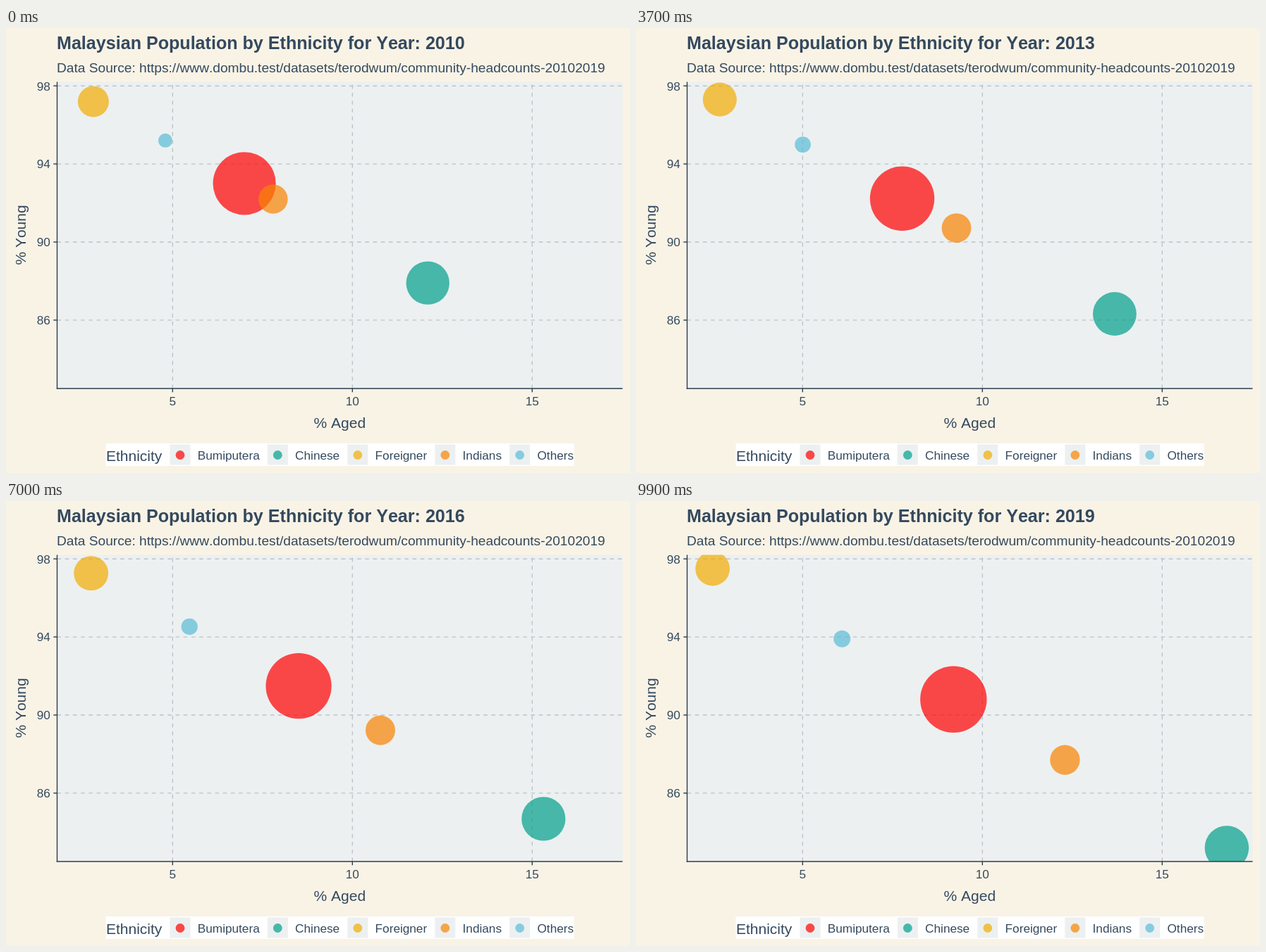
Write an HTML page that moves like this. It is 885 px wide and 632 px high and loops after 10000 ms.

```html
<!DOCTYPE html>
<html lang="en">
<head>
<meta charset="utf-8">
<title>Population by ethnicity</title>
<style>
  html, body { margin: 0; width: 100%; height: 100%; overflow: hidden; background: #f9f3e6; }
  svg { display: block; width: 885px; height: 632px; }
  text {
    font-family: "Liberation Sans", Arial, sans-serif;
    font-size: 17.2px; font-kerning: none; fill: #34495e;
  }
  .title { font-size: 25.1px; font-weight: bold; }
  .sub { font-size: 19.15px; }
  .name { font-size: 21px; }
  .mid { text-anchor: middle; }
  .end { text-anchor: end; }
  .grid { stroke: #bdc3c7; stroke-width: 1.4; stroke-dasharray: 5.6 5.6; }
  .axis { stroke: #2c3e50; stroke-width: 1.4; }
  .dot { fill-opacity: .7; }
</style>
</head>
<body>
<svg viewBox="0 0 885 632">
  <clipPath id="panel"><rect x="72.5" y="76.5" width="802" height="435.5"/></clipPath>
  <rect x="72.5" y="76.5" width="802" height="435.5" fill="#ecf0f1"/>
  <g id="grid"></g>
  <g id="bubbles" clip-path="url(#panel)"></g>
  <g id="axes"></g>
  <text id="title" class="title" x="72" y="30"></text>
  <text class="sub" x="72" y="63">Data Source: https://www.dombu.test/datasets/terodwum/community-headcounts-20102019</text>
  <text class="name mid" x="473.3" y="567.5">% Aged</text>
  <text class="name mid" transform="translate(28 294) rotate(-90)">% Young</text>
  <rect x="141.5" y="590" width="664" height="32" fill="#fff"/>
  <text class="name" x="142" y="615">Ethnicity</text>
  <g id="legend"></g>
</svg>
<script>
const STEP = 100, STEPS = 100, FIRST = 2010, YEARS = 9;

// trend: a few turning points as [years since FIRST, % aged, radius]
const groups = [
  { name: "Bumiputera", color: "#ff0000", key: 232.5,
    trend: [[0, 7, 44.6], [3, 7.7, 45.6], [6, 8.36, 46.5], [9, 9.24, 47.2]] },
  { name: "Chinese", color: "#00a08a", key: 370.8,
    trend: [[0, 12.1, 30.7], [3, 13.54, 30.9], [6, 15.06, 31.1], [9, 16.84, 31.3]] },
  { name: "Foreigner", color: "#f2ad00", key: 484.3,
    trend: [[0, 2.8, 22], [3, 2.74, 24], [6, 2.74, 24.4], [7, 2.8, 24.5], [9, 2.54, 24.4]] },
  { name: "Indians", color: "#f98400", key: 608.3,
    trend: [[0, 7.8, 20.7], [3, 9.1, 20.9], [6, 10.56, 21], [9, 12.3, 21.2]] },
  { name: "Others", color: "#5bbcd6", key: 714.2,
    trend: [[0, 4.8, 10], [3, 4.86, 11.3], [4, 5.19, 11.5], [5, 5.19, 11.5], [9, 6.1, 12]] }
];

const byId = id => document.getElementById(id);
const toX = aged => 236.1 + (aged - 5) * 51;
const toY = young => 82.2 + (98 - young) * 27.72;
const mix = (a, b, f) => a + (b - a) * f;

function add(parent, tag, attrs, text = "") {
  const el = document.createElementNS("http://www.w3.org/2000/svg", tag);
  for (const k in attrs) el.setAttribute(k, attrs[k]);
  el.textContent = text;
  return byId(parent).appendChild(el);
}

function line(parent, x1, y1, x2, y2) {
  add(parent, "line", { class: parent === "grid" ? "grid" : "axis", x1, y1, x2, y2 });
}

// Value of one trend column at a given year
function along(trend, year, col) {
  const i = trend.findIndex(p => p[0] >= year) || 1;
  const a = trend[i - 1], b = trend[i];
  return mix(a[col], b[col], (year - a[0]) / (b[0] - a[0]));
}

// Yearly figures have one decimal; bubbles glide straight between them
function agedAt(trend, year) {
  const from = Math.min(Math.floor(year), YEARS - 1);
  const figure = y => Math.round(along(trend, y, 1) * 10) / 10;
  return mix(figure(from), figure(from + 1), year - from);
}

for (let v = 98; v >= 86; v -= 4) {
  const y = toY(v);
  line("grid", 72.5, y, 874.5, y);
  line("axes", 67.3, y, 72.5, y);
  add("axes", "text", { class: "end", x: 62.8, y: y + 6.3 }, v);
}
for (let v = 5; v <= 15; v += 5) {
  const x = toX(v) + 0.2;
  line("grid", x, 512, x, 76.5);
  line("axes", x, 512, x, 517.2);
  add("axes", "text", { class: "mid", x, y: 536 }, v);
}
line("axes", 72.5, 76.5, 72.5, 512.7);
line("axes", 71.8, 512, 874.5, 512);

for (const g of groups) {
  const dot = { class: "dot", fill: g.color };
  g.bubble = add("bubbles", "circle", dot);
  add("legend", "rect", { x: g.key, y: 591.5, width: 29, height: 29, fill: "#ecf0f1" });
  add("legend", "circle", { ...dot, cx: g.key + 14.5, cy: 606.5, r: 6.4 });
  add("legend", "text", { x: g.key + 39.3, y: 613.3 }, g.name);
}

function draw(step) {
  const year = YEARS * step / (STEPS - 1);
  byId("title").textContent =
    `Malaysian Population by Ethnicity for Year: ${Math.round(FIRST + year)}`;
  for (const { bubble, trend } of groups) {
    const aged = agedAt(trend, year);
    bubble.setAttribute("cx", toX(aged));
    bubble.setAttribute("cy", toY(100 - aged));
    bubble.setAttribute("r", along(trend, year, 2));
  }
}

const start = performance.now();
function tick() {
  const t = Math.max(0, performance.now() - start);
  draw(Math.floor(t / STEP) % STEPS);
  requestAnimationFrame(tick);
}
tick();
</script>
</body>
</html>
```
